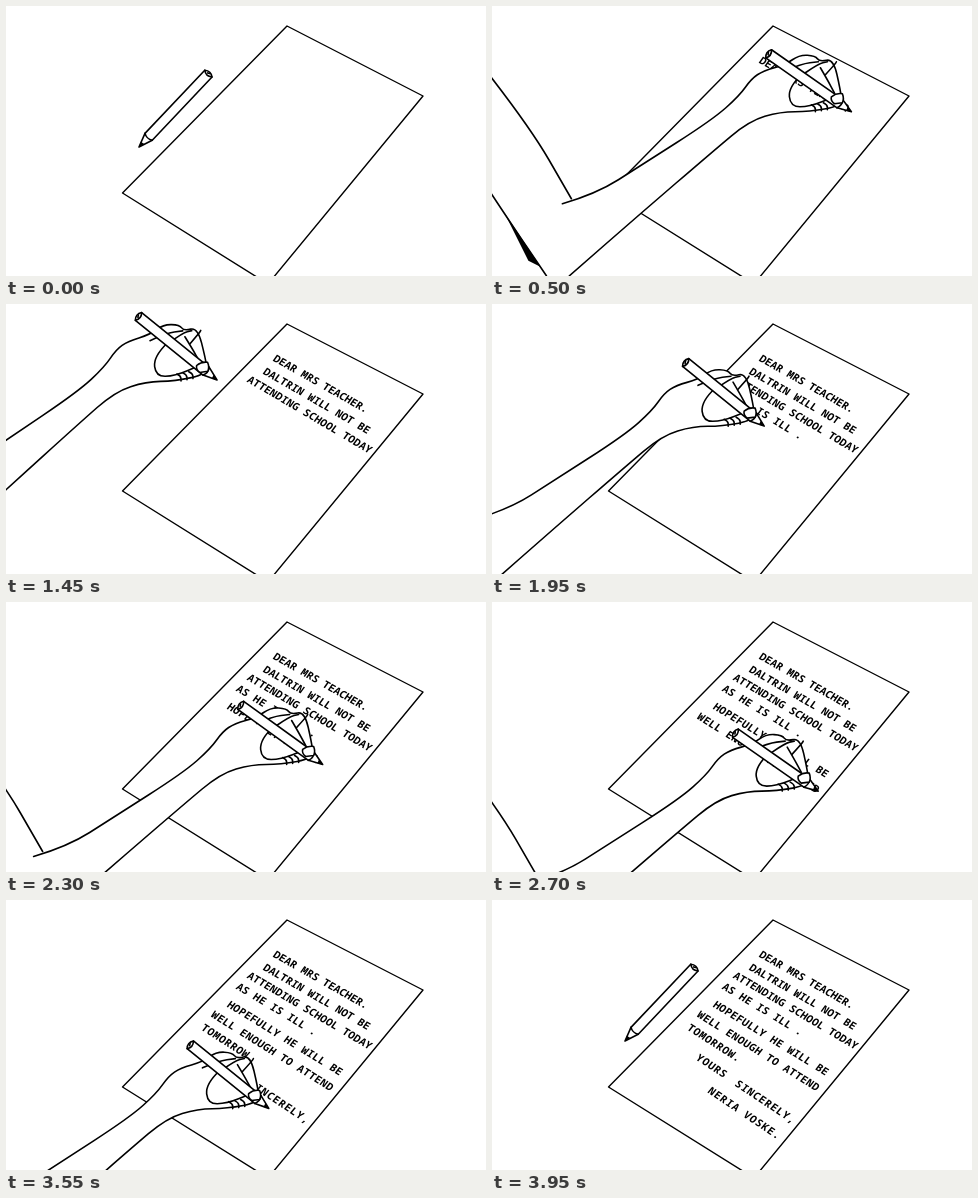
An HTML page with a canvas for the animation above (4 s loop, 480x270 px).

```html
<!DOCTYPE html>
<html lang="en">
<head>
<meta charset="utf-8">
<style>
  html, body { margin: 0; width: 100%; height: 100%; overflow: hidden; background: #fff; }
  canvas { display: block; }
</style>
</head>
<body>
<canvas id="stage" width="480" height="270"></canvas>
<script>
const ctx = document.getElementById('stage').getContext('2d');
const LOOP = 4000, STEP = 50, PICK = 150, REST = 3900;
const CHAR_TIME = 15, FONT_SIZE = 10.5;
const rad = degrees => degrees * Math.PI / 180;

// Start time, place and text; the writing grows looser and steeper down the page.
const lines = [
  [250, 268, 54, 'DEAR MRS TEACHER.'],
  [685, 258, 67, 'DALTRIN WILL NOT BE'],
  [1075, 242, 75, 'ATTENDING SCHOOL TODAY'],
  [1665, 231, 86, 'AS HE IS ILL .'],
  [2050, 222, 104, 'HOPEFULLY HE WILL BE'],
  [2385, 206, 114, 'WELL ENOUGH TO ATTEND'],
  [2800, 196, 127, 'TOMORROW.'],
  [3050, 205, 157, 'YOURS'],
  [3300, 244, 183, 'SINCERELY,'],
  [3665, 217, 190, 'NERIA VOSKE.']
].map(([start, x, y, text], i) => ({
  start, x, y, text,
  end: start + text.length * CHAR_TIME,
  gap: i * 0.09,
  angle: rad(29.5 + i * 0.5)
}));

// Path of the pen tip: arrival, pauses beside the page and exit, plus every line.
const keys = [[0, -60, 250], [PICK, 140, 150], [1450, 211, 76], [1500, 211, 76], [3200, 196, 166], [3950, -60, 250]];
for (const { start, end, x, y, text, gap, angle } of lines) {
  const length = text.length * (FONT_SIZE * 0.6 + gap);
  keys.push([start, x, y + 3], [end, x + length * Math.cos(angle), y + length * Math.sin(angle)]);
}
keys.sort((a, b) => a[0] - b[0]);

function tipAt(t) {
  const i = Math.max(1, keys.findIndex(k => k[0] >= t));
  const [t0, x0, y0] = keys[i - 1], [t1, x1, y1] = keys[i];
  const f = (t - t0) / (t1 - t0);
  return [x0 + (x1 - x0) * f, y0 + (y1 - y0) * f];
}

// Smooth curve through the midpoints of a flat x,y list.
function curve(...p) {
  const path = new Path2D(), n = p.length;
  path.moveTo(p[0], p[1]);
  for (let i = 2; i < n - 2; i += 2)
    path.quadraticCurveTo(p[i], p[i + 1], (p[i] + p[i + 2]) / 2, (p[i + 1] + p[i + 3]) / 2);
  path.lineTo(p[n - 2], p[n - 1]);
  return path;
}

// Arm and hand, relative to the pen tip.
const outline = curve(
  -289, 92, -255, 82, -211, 54, -139, 8, -112, -16, -100, -33, -88, -41, -66, -47, -52, -57,
  -36, -56, -32, -50, -18, -53, -11, -22, -9, -6, -42, 0, -71, 0, -102, 9, -139, 40, -211, 102, -282, 164);
const opening = curve(-49, -38, -63, -25, -61, -5, -42, -5, -17, -15);
const skin = new Path2D(outline);
skin.addPath(opening);
const creases = [opening, curve(-385, -66, -325, 9, -280, 87), curve(-385, 44, -345, 105, -305, 164)];
for (let i = 0; i < 3; i++) {
  creases.push(curve(-66 + 20 * i, -41 + 2 * i, -50 + 17 * i, -48, -33 + 9 * i, -50));
  creases.push(curve(-40 + 6 * i, -7 - i, -36 + 6 * i, -5 - i, -36 + 6 * i, 0 - i));
}
creases.push(curve(-31, -44, -24, -32, -17, -19));
const sleeve = new Path2D('M-347 101L-311 155L-323 149Z');
const thumb = new Path2D('M-20 -15Q-15 -19 -9 -18Q-7 -13 -9 -9L-17 -8Q-21 -11 -20 -15Z');

const paper = new Path2D('M281 20L417 90L262 278L116.5 187Z');
const barrel = new Path2D('M0 0L-14 -5L-101 -5Q-105 0 -101 5L-14 5Z');
const trim = new Path2D('M-14 -5Q-11 0 -14 5M-101 -5Q-97 0 -101 5M-102 -1L-101 1');
const lead = new Path2D('M0 0L-6 -2.2L-5 2.2Z');

function shape(path) {
  ctx.fillStyle = '#fff';
  ctx.fill(path);
  ctx.stroke(path);
}

function ink(path) {
  ctx.fillStyle = '#000';
  ctx.fill(path);
}

function at(x, y, angle, paint) {
  ctx.save();
  ctx.translate(x, y);
  ctx.rotate(angle);
  paint();
  ctx.restore();
}

function pen() {
  shape(barrel);
  ctx.stroke(trim);
  ink(lead);
}

function write(t) {
  ctx.fillStyle = '#000';
  ctx.font = `bold ${FONT_SIZE}px "Noto Sans Mono", monospace`;
  ctx.textBaseline = 'middle';
  for (const { start, x, y, text, gap, angle } of lines) {
    const count = Math.max(0, Math.floor((t - start) / CHAR_TIME));
    ctx.letterSpacing = gap + 'px';
    at(x, y, angle, () => {
      ctx.transform(1, 0, -0.1, 1, 0, 0);
      ctx.fillText(text.slice(0, count), 0, 0);
    });
  }
}

function arm(t) {
  const [x, y] = tipAt(t);
  const lean = rad(Math.min(0, Math.max(-2, (x - 283) * 0.02)));
  const reach = Math.min(1, Math.max(0, (x - 285) / 40));
  at(x, y, lean, () => {
    ctx.fillStyle = '#fff';
    ctx.fill(skin, 'evenodd');
    ctx.stroke(outline);
    creases.forEach(c => ctx.stroke(c));
    ink(sleeve);
    if (t >= PICK && t < REST) at(0, 0, rad(39 - 4 * reach) - lean, pen);
    shape(thumb);
  });
}

function draw(now) {
  const t = Math.floor(now % LOOP / STEP) * STEP;
  ctx.fillStyle = '#fff';
  ctx.fillRect(0, 0, 480, 270);
  ctx.strokeStyle = '#000';
  ctx.lineJoin = ctx.lineCap = 'round';
  ctx.lineWidth = 1.4;
  ctx.stroke(paper);
  write(t);
  ctx.lineWidth = 1.6;
  if (t < PICK || t >= REST) at(133, 141, rad(133.4), pen);
  if (t > 0 && t < LOOP - STEP) arm(t);
}

const begin = performance.now();
function tick() {
  draw(performance.now() - begin);
  requestAnimationFrame(tick);
}
tick();
</script>
</body>
</html>
```
